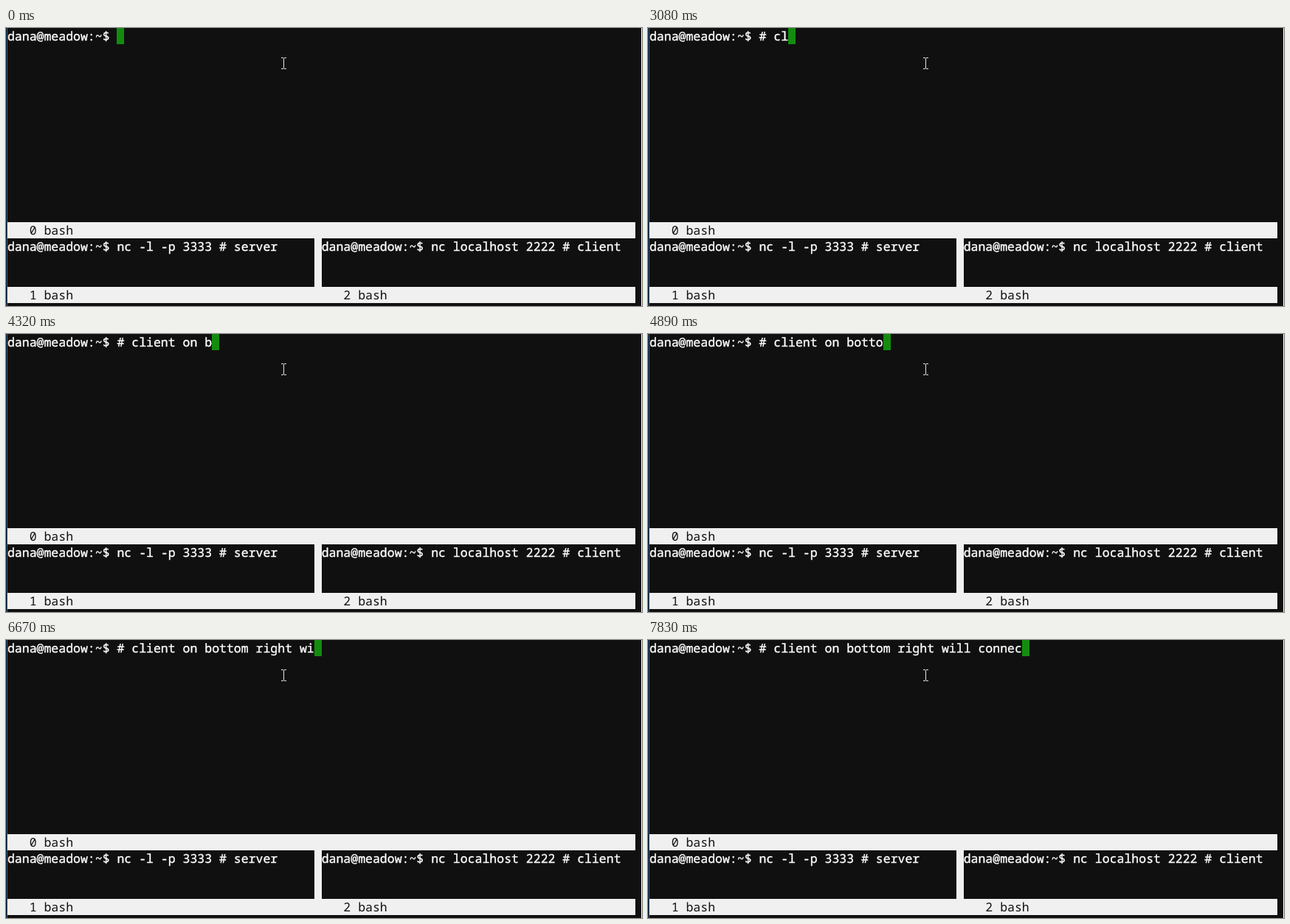
Animation, 862 px wide and 378 px high, one loop 8 s. Source, as an HTML page:

```html
<!DOCTYPE html>
<html lang="en">
<head>
<meta charset="utf-8">
<title>Terminal</title>
<style>
html, body { margin: 0; width: 100%; height: 100%; overflow: hidden; background: #101010; }
svg { display: block; }
text {
  font: 16.5px "Noto Sans Mono", "DejaVu Sans Mono", monospace;
  white-space: pre;
  text-rendering: geometricPrecision;
  fill: #fff;
  stroke: #fff;
  stroke-width: 0.35px;
}
.bar { fill: #f0f0f0; }
text.dark { fill: #101010; stroke: none; }
</style>
</head>
<body>
<svg id="stage" width="862" height="378" viewBox="0 0 862 378">
  <rect width="862" height="378" fill="#101010"/>
  <rect x="1" width="1" height="378" fill="#1267b0"/>
  <rect x="861" width="1" height="378" fill="#fff"/>
</svg>
<script>
const LOOP = 8000, CELL = 9.9, ROW = 22, LEFT = 1.95;
const PROMPT = "dana@meadow:~$ ";

// bursts of typing: text, start and time per key in ms
const BURSTS = [
  ["# ", 870, 840],
  ["cl", 3020, 60],
  ["ien", 3230, 110],
  ["t ", 3650, 90],
  ["on ", 3900, 120],
  ["bo", 4320, 120],
  ["tt", 4690, 50],
  ["om right ", 4890, 98.7],
  ["will co", 6520, 133],
  ["nne", 7370, 120],
  ["c", 7830, 100]
];

const stage = document.getElementById("stage");
const colX = col => Math.round(LEFT + col * CELL);

function add(tag, attrs, content = "") {
  const el = document.createElementNS("http://www.w3.org/2000/svg", tag);
  for (const key in attrs) el.setAttribute(key, attrs[key]);
  el.textContent = content;
  return stage.appendChild(el);
}

function block(col, row, cols, rows, attrs) {
  const x = colX(col);
  return add("rect", { x, y: row * ROW, width: colX(col + cols) - x, height: rows * ROW, ...attrs });
}

function write(col, row, content, cls = "") {
  return add("text", { x: LEFT + col * CELL, y: row * ROW + 17, class: cls }, content);
}

block(0, 12, 86, 1, { class: "bar" });
block(0, 16, 86, 1, { class: "bar" });
block(42, 13, 1, 3, { class: "bar" });
write(3, 12, "0 bash", "dark");
write(3, 16, "1 bash", "dark");
write(46, 16, "2 bash", "dark");
write(0, 13, PROMPT + "nc -l -p 3333 # server");
write(43, 13, PROMPT + "nc localhost 2222 # client");

const line = write(0, 0, PROMPT);
const cursor = block(PROMPT.length, 0, 1, 1, { fill: "#138c0e" });

// mouse pointer
add("path", {
  d: "M373 40.5h3M377 40.5h3M376.5 41v14M373 55.5h3M377 55.5h3",
  stroke: "#e6e6e6", fill: "none"
});

function typedAt(now) {
  return BURSTS.map(([text, start, gap]) =>
    text.slice(0, Math.max(0, Math.floor((now - start) / gap) + 1))).join("");
}

function draw() {
  const content = PROMPT + typedAt(performance.now() % LOOP);
  if (line.textContent !== content) {
    const x = colX(content.length);
    line.textContent = content;
    cursor.setAttribute("x", x);
    cursor.setAttribute("width", colX(content.length + 1) - x);
  }
  requestAnimationFrame(draw);
}
draw();
</script>
</body>
</html>
```
